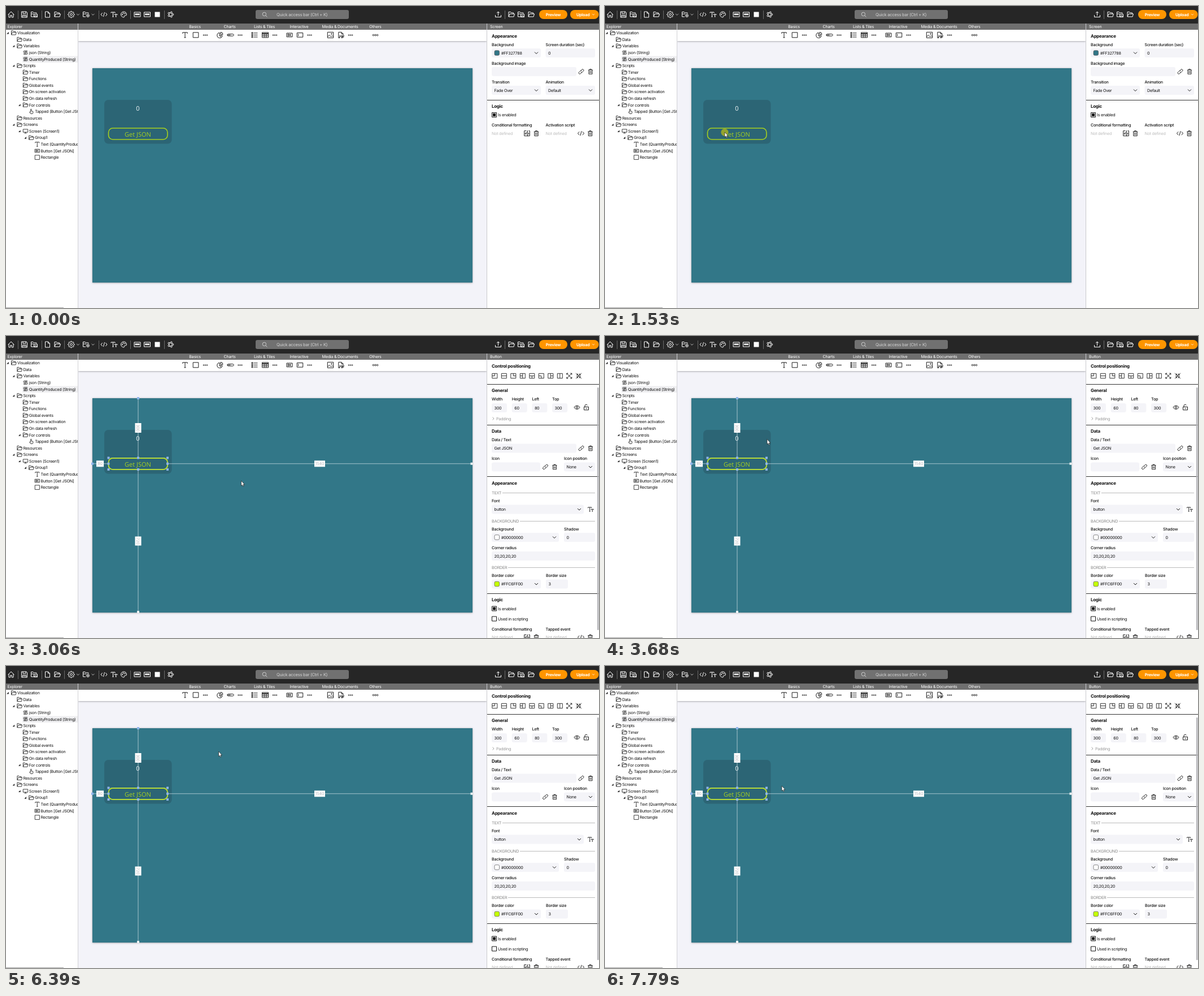
Recreate the animation shown at these times as an HTML page. Size 1050 px wide and 534 px high, loop 8000 ms.

```html
<!DOCTYPE html>
<html lang="en">
<head>
<meta charset="utf-8">
<title>Screen editor</title>
<style>
html, body { margin: 0; width: 100%; height: 100%; overflow: hidden; background: #f3f3f9; }
svg { display: block; width: 1050px; height: 534px; }
text { font-family: Inter, "Liberation Sans", sans-serif; letter-spacing: -.25px; text-rendering: geometricPrecision; white-space: pre; }
.face { font-family: "Open Sans", "Noto Sans", sans-serif; letter-spacing: 0; }
</style>
</head>
<body>
<svg id="stage" viewBox="0 0 1050 534" xmlns="http://www.w3.org/2000/svg"></svg>
<script>
const LOOP = 8000, INK = '#1c1c1c', FIELD = '#f4f4f8', TEAL = '#327788', LIME = '#a6d01f';

// Drawing helpers, each returns markup
const text = (x, y, s, { size = 7.2, fill = '#111', weight = 400, anchor = 'start', more = '' } = {}) =>
  `<text x="${x}" y="${y + size * .36}" font-size="${size}" fill="${fill}" font-weight="${weight}" text-anchor="${anchor}" ${more}>${s}</text>`;
const rect = (x, y, w, h, fill, r = 0, more = '') =>
  `<rect x="${x}" y="${y}" width="${w}" height="${h}" rx="${r}" fill="${fill}" ${more}/>`;
const path = (d, stroke = INK, w = 1, more = '') =>
  `<path d="${d}" fill="none" stroke="${stroke}" stroke-width="${w}" ${more}/>`;
const box = (x, y, w, h) => `M${x} ${y}h${w}v${h}h${-w}z`;
const ring = (x, y, r) => `M${x - r} ${y}a${r} ${r} 0 1 0 ${2 * r} 0a${r} ${r} 0 1 0 ${-2 * r} 0`;
const cog = (n, outer, inner) => 'M' + Array.from({ length: n * 4 }, (_, i) => {
  const a = (i - .5) * Math.PI / (2 * n), r = i % 4 < 2 ? outer : inner;
  return `${(r * Math.cos(a)).toFixed(2)} ${(r * Math.sin(a)).toFixed(2)}`;
}).join('L') + 'z';

const FOLDER = 'M-5 4V-4.5H-1.5L-.3-3H3.5V-1M-5 4-3-1H5.5L4 4z';
const ICONS = {
  home: 'M-5.5 .5 0-5 5.5 .5M-4-1V5H-1.2V1.5H1.2V5H4V-1',
  save: 'M-5-5H3.5L5-3.5V5H-5zM-2.5-5V-1.8H2.5V-5M-3 5V1H3V5M-1.6 2.8H1.6',
  folder: FOLDER,
  folderSave: 'M-5.5 4V-4.5H-2L-.8-3H4V-1.5M-5.5 4V-1H-1M-5.5 4H-1' + box(-.5, -.5, 6, 5) + 'M1 4.5V2.2H4V4.5',
  folderCog: 'M-1 4H-5.5V-4.5H-2L-.8-3H4V-1.5M-5.5-1H0' + ring(3, 2, 2.4) + ring(3, 2, .7),
  file: 'M-4-5H1L4-2V5H-4zM1-5V-2H4',
  gear: cog(8, 5.8, 4.3) + ring(0, 0, 1.9),
  chev: 'M-3-1.5 0 1.5 3-1.5',
  code: 'M-2.8-3-5.5 0-2.8 3M2.8-3 5.5 0 2.8 3M1-4-1 4',
  type: 'M-5-2.5V-4H2V-2.5M-1.5-4V4M-2.7 4H-.3M1.2 1V-.2H6V1M3.6-.2V4M2.8 4H4.5',
  palette: 'M0-5a5 5 0 1 0 0 10c1.5 0 .4-1.8 1-2.6S5 2.8 5 0A5 5 0 0 0 0-5' + ring(-2.4, 0, .7) + ring(-.8, -2.5, .7) + ring(2, -1.8, .7),
  card: box(-5.5, -4, 11, 8) + 'M-4-1.2H4M-4 .6H4M-4-.3H4',
  puzzle: cog(5, 5.2, 3.5) + ring(0, 0, 2.7),
  upload: 'M0 2V-5M-2.5-2.5 0-5 2.5-2.5M-5 1V4.5H5V1',
  search: ring(-.6, -.6, 3.2) + 'M1.8 1.8 4.4 4.4',
  T: 'M-4.2-2.5V-4.5H4.2V-2.5M0-4.5V4.5M-1.6 4.5H1.6',
  square: box(-4.8, -4.5, 9.6, 9),
  pie: 'M-1-4a4.6 4.6 0 1 0 5 5H-1zM1-5V-1H5A4 4 0 0 0 1-5M-1 1 2.5 4.3',
  slider: 'M-4-1.7H4a1.7 1.7 0 0 1 0 3.4H-4a1.7 1.7 0 0 1 0-3.4M-5.5 0H0',
  list: box(-5, -4.5, 2, 2) + box(-5, -1, 2, 2) + box(-5, 2.5, 2, 2) + 'M-1.5-3.5H5.5M-1.5 0H5.5M-1.5 3.5H5.5',
  table: box(-5.5, -4.5, 11, 9) + 'M-5.5-2.8H5.5M-5.5-1.5H5.5M-5.5 1.5H5.5M-1.8-2V4.5M1.8-2V4.5',
  button: box(-5, -3.3, 10, 6.6) + 'M-2.8-1.5V1.5H-1V-1.5zM.8-1.8V1.8M2.9-1.7 1 0 2.9 1.7',
  input: box(-5.2, -3.8, 10.4, 7.6) + 'M-2.8-2V2',
  image: box(-5.2, -5, 10.4, 10) + 'M-5 3-1.8 0 1 3 3 1.2 5 3' + ring(2, -2, .9),
  pdf: 'M-2 5H-4.2V-5H1L4-2V0M1-5V-2H4M-2.5 1H-1V3H-2.5V5M1 1V5H2.5V1zM4 5V1H6M4 3H5.5',
  string: 'M4-3.6H-2.5a1.7 1.7 0 0 0 0 3.4H2.5a1.9 1.9 0 0 1 0 3.8H-4M4-1.8H-2M-4 1.8H2',
  hand: 'M-1.5 1V-4.2a.9.9 0 0 1 1.8 0V-1L3.5 0V3L2.5 4.6H-1.5L-4 1.2-2.8 .6-1.5 1.8',
  screen: box(-5, -4, 10, 6.2) + 'M0 2.2V4.2M-2.5 4.2H2.5',
  link: 'M-.5-2 1.5-4a2 2 0 0 1 2.8 2.8L2 1a2 2 0 0 1-2.8 0M.5 2-1.5 4a2 2 0 0 1-2.8-2.8L-2-1A2 2 0 0 1 .8-1',
  trash: 'M-4.2-3H4.2M-1.5-3V-4.5H1.5V-3M-3.2-3V4.5H3.2V-3M-1.1-1V2.8M1.1-1V2.8',
  rule: 'M-1-4.5H-4.8V4.5H4.8V-4.5H3M1-5V5M-3 2V-1M-1.2 2V-2.5M3 2V-1',
  eye: 'M-5.2 0Q0-6.5 5.2 0Q0 6.5-5.2 0' + ring(0, 0, 1.6),
  lock: box(-4, -1, 8, 5.5) + 'M-2.5-1V-3a2.3 2.3 0 0 1 4.4-.8M0 1V2.8'
};
const icon = (name, x, y, stroke = INK, scale = 1, w = 1) =>
  `<g transform="translate(${x} ${y}) scale(${scale})">${path(ICONS[name], stroke, w, 'stroke-linejoin="round"')}</g>`;
const dots = (x, y) => [-3, 0, 3].map(d => path(ring(x + d, y, .8), INK, .9)).join('');
const divider = x => rect(x, 8, 1, 15, '#6a6a6a');

// Side panel helpers
const PX = 860;
const head = (y, s) => text(PX, y, s, { size: 7.9, weight: 700 });
const label = (x, y, s) => text(x, y, s, { weight: 500 });
const field = (x, y, w, s = '', h = 16) => rect(x, y - h / 2, w, h, FIELD, 3) + text(x + 4.5, y, s);
const select = (x, y, w, s, swatch) => field(x, y, w, swatch ? '' : s) + icon('chev', x + w - 8, y) +
  (swatch ? rect(x + 5, y - 4.3, 8.5, 8.5, swatch, 2, 'stroke="#555" stroke-width=".7"') + text(x + 17, y, s) : '');
const rule = y => rect(852, y, 198, 1, '#333');
const group = (y, s, x) => text(PX, y, s, { fill: '#8a8a8a' }) + rect(x, y, 1043 - x, 1, '#bbb');
const check = (y, s, on) => path(box(860.5, y - 4, 8, 8), '#111', 1, 'stroke-linejoin="round"') +
  (on ? rect(862, y - 2.5, 5, 5, '#111') : '') + text(871, y, s);
const linkTrash = (x, y) => icon('link', x, y, INK, .95) + icon('trash', x + 16.5, y, INK, .95);
const scripts = (y, s) => {
  const none = { fill: '#bdbdbd' };
  return label(PX, y, 'Conditional formatting') + label(955.5, y, s) +
    text(PX, y + 14.7, 'Not defined', none) + text(955.5, y + 14.7, 'Not defined', none) +
    icon('rule', 922.5, y + 14.7) + icon('trash', 939, y + 14.7) +
    icon('code', 1018, y + 14.7) + icon('trash', 1034.5, y + 14.7);
};

function topBar() {
  const row = [['home', 9], ['save', 32.5], ['folderSave', 50], ['file', 73.5], ['folder', 91], ['gear', 115.5],
    ['folderCog', 142], ['code', 173.5], ['type', 191], ['palette', 208.5], ['card', 232.5], ['card', 250],
    ['puzzle', 291.5], ['upload', 871.5], ['folder', 895], ['folderSave', 912], ['folder', 930]];
  const pill = (x, w) => rect(x, 7, w, 16, '#ff9500', 8);
  const bold = { fill: '#fff', weight: 700 };
  return rect(0, 0, 1050, 31, '#262626') + row.map(([n, x]) => icon(n, x, 15, '#fff')).join('') +
    [21, 63, 103, 164, 220, 280, 883].map(divider).join('') +
    icon('chev', 127.5, 15, '#ddd', .8) + icon('chev', 154, 15, '#ddd', .8) +
    rect(263.5, 10.5, 9, 9, '#fff') +
    rect(442, 7, 165, 16, '#717171', 3) + icon('search', 458, 15, '#ccc') +
    text(479, 15, 'Quick access bar (Ctrl + K)', { size: 7.6, fill: '#d4d4d4' }) +
    pill(944, 50) + text(969, 15, 'Preview', { ...bold, anchor: 'middle' }) +
    pill(999, 50.5) + text(1010, 15, 'Upload', bold) + icon('chev', 1040, 15, '#fff', .7);
}

function toolStrip() {
  const groups = [['Basics', 334.5], ['Charts', 396], ['Lists &amp; Tiles', 457.5], ['Interactive', 519],
    ['Media &amp; Documents', 591.5], ['Others', 654]];
  const tools = [['T', 317], ['square', 336], ['pie', 379], ['slider', 397.5], ['list', 440], ['table', 459],
    ['button', 502], ['input', 520.5], ['image', 574.5], ['pdf', 593]];
  return rect(128, 42, 723, 20, '#fff', 0, 'filter="url(#soft)"') +
    rect(0, 31, 1050, 11, '#6f6f6f') +
    groups.map(([s, x]) => text(x, 36.7, s, { fill: '#fff', anchor: 'middle' })).join('') +
    tools.map(([n, x]) => icon(n, x, 51.3)).join('') +
    [353, 414.5, 476, 537.5, 610].map(x => dots(x, 51.5)).join('') +
    [-3.6, 0, 3.6].map(d => path(ring(654 + d, 51.5, 1.3), INK, .9)).join('');
}

function explorer() {
  // depth, icon, label, expanded
  const rows = [[0, 'folder', 'Visualization', 1], [1, 'folder', 'Data'], [1, 'folder', 'Variables', 1],
    [2, 'string', 'json (String)'], [2, 'string', 'QuantityProduced (String)'], [1, 'folder', 'Scripts', 1],
    [2, 'folder', 'Timer'], [2, 'folder', 'Functions'], [2, 'folder', 'Global events'],
    [2, 'folder', 'On screen activation'], [2, 'folder', 'On data refresh'], [2, 'folder', 'For controls', 1],
    [3, 'hand', 'Tapped (Button [Get JSON])'], [1, 'folder', 'Resources'], [1, 'folder', 'Screens', 1],
    [2, 'screen', 'Screen (Screen1)', 1], [3, 'folder', 'Group1', 1], [4, 'T', 'Text (QuantityProduced)'],
    [4, 'button', 'Button [Get JSON]'], [4, 'square', 'Rectangle']];
  return rect(0, 42, 127, 492, '#fff') + rect(29, 88.5, 98, 11.5, '#efeff1') +
    '<g clip-path="url(#tree)">' + rows.map(([depth, name, s, open], i) => {
      const x = 20 + 10.4 * depth, y = 47.6 + 11.58 * i;
      return text(x, y, s) + icon(name, x - 6.3, y, INK, .84) +
        (open ? `<path d="M${x - 15.2} ${y - 1.8}v3.6h-3.6z" fill="#222"/>` : '');
    }).join('') + '</g>' + rect(0, 532.7, 102, 1.3, '#b5b5b5') +
    rect(127, 31, 1, 503, '#d0d0d4') + text(2.5, 36.7, 'Explorer', { fill: '#fff' });
}

function canvas() {
  return rect(153, 110, 673, 379, TEAL, 0, 'filter="url(#soft)"') +
    rect(174, 166, 119.5, 77.5, '#2c6575', 7) +
    text(233.5, 181.5, '0', { size: 11, fill: '#f4f8f9', anchor: 'middle', more: 'class="face"' }) +
    rect(181.5, 216, 104.5, 20, 'none', 7.5, `stroke="${LIME}" stroke-width="1.6"`) +
    text(233.5, 226.9, 'Get JSON', { size: 11, fill: LIME, weight: 500, anchor: 'middle', more: 'class="face"' });
}

function selection() {
  const grip = (x, y, fill = '#8db4ea') => rect(x - 2, y - 2, 4, 4, fill);
  const tag = (x, y, w, s, turn = 0) => `<g transform="translate(${x} ${y}) rotate(${turn})">` +
    rect(-w / 2, -5.5, w, 11, '#fff') + text(0, 0, s, { fill: '#b9bcc0', anchor: 'middle' }) + '</g>';
  const grips = [181.5, 234, 286].flatMap(x => [215.5, 225.8, 236].map(y => x === 234 && y === 225.8 ? '' : grip(x, y)));
  return path('M234 110V215M234 236V488M153 225.8H181M286 225.8H825', '#c4d9df', .8) +
    rect(181.5, 216, 104.5, 20, 'none', 7.5, 'stroke="#c0e220" stroke-width="1.6"') +
    path(box(181.5, 215.5, 104.5, 20.5), '#cfe3ef', .5, 'opacity=".4"') + grips.join('') +
    grip(234, 110) + grip(153, 225.8) + grip(234, 488, '#eef3f5') + grip(824.5, 225.8, '#eef3f5') +
    tag(234, 162.5, 17, '300', 90) + tag(234, 362.5, 16, '720', 90) + tag(166.5, 225.8, 13, '80') + tag(555.5, 225.8, 19, '1540');
}

function screenPanel() {
  return head(53, 'Appearance') + label(PX, 68, 'Background') + label(955.5, 68, 'Screen duration (sec)') +
    select(PX, 83, 87, '#FF327788', TEAL) + field(955.5, 83, 87.5, '0') +
    label(PX, 101, 'Background image') + field(PX, 116, 150) + linkTrash(1018.5, 116) +
    label(PX, 134, 'Transition') + label(955.5, 134, 'Animation') +
    select(PX, 149, 87, 'Fade Over') + select(955.5, 149, 87.5, 'Default') + rule(166) +
    head(177, 'Logic') + check(192.5, 'Is enabled', true) + scripts(210.5, 'Activation script');
}

function buttonPanel() {
  const marks = ['M-4.5 0H0V-4.2', 'M-4.5 0H4.5M0 0V0', 'M0-4.2V0H4.5', 'M0-4.2V4.2M-4.5 0H0', 'M-4.5 0H4.5M0 0V4.2',
    'M-4.5 0H0V4.2', 'M0-4.2V4.2M0 0H4.5', 'M0-4.2V4.2M-2 0H-2'];
  const align = marks.map((d, i) => `<g transform="translate(${865.3 + 16.5 * i} 70.5)">` +
    path(box(-4.5, -4.2, 9, 8.4) + d, INK, .9) + '</g>').join('');
  const spread = (x, out) => `<g transform="translate(${x} 70.5)">` + [0, 90, 180, 270].map(a =>
    path(out ? 'M2-4.5H4.5V-2M4.5-4.5 1.5-1.5' : 'M1.5-4V-1.5H4M1.5-1.5 4.8-4.8', INK, 1, `transform="rotate(${a})"`)).join('') +
    path(box(-1, -1, 2, 2), INK, .8) + '</g>';
  const sizes = [['Width', '300'], ['Height', '60'], ['Left', '80'], ['Top', '300']];
  return head(53, 'Control positioning') + align + spread(997.3, true) + spread(1014, false) + rule(85) +
    head(96.5, 'General') + sizes.map(([s, v], i) => label(PX + 35.7 * i, 111.5, s) + field(PX + 35.7 * i, 127, 27, v)).join('') +
    icon('eye', 1011, 126.3) + icon('lock', 1027.5, 126.3) +
    path('M861.5 143.5 864 146 861.5 148.5', '#999', .9) + text(868, 146, 'Padding', { fill: '#999' }) + rule(157) +
    head(168.5, 'Data') + label(PX, 183.5, 'Data / Text') + field(PX, 198.5, 150, 'Get JSON') + linkTrash(1018.5, 198.5) +
    label(PX, 216.5, 'Icon') + field(PX, 231.5, 86) + linkTrash(955, 231.5) +
    label(988, 216.5, 'Icon position') + select(988, 231.5, 55, 'None') + rule(248) +
    head(260, 'Appearance') + group(277, 'TEXT', 879) + label(PX, 291.5, 'Font') +
    select(PX, 306.5, 163, 'button') + icon('type', 1035, 306.5, INK, .9) +
    group(327, 'BACKGROUND', 910) + label(PX, 341, 'Background') + label(988, 341, 'Shadow') +
    select(PX, 356, 119, '#00000000', '#fff') + field(988, 356, 55, '0') +
    label(PX, 374, 'Corner radius') + field(PX, 389, 183, '20,20,20,20') +
    group(409, 'BORDER', 889) + label(PX, 423.5, 'Border color') + label(956, 423.5, 'Border size') +
    select(PX, 438.5, 87, '#FFC6FF00', '#c6ff00') + field(956, 438.5, 39, '3') + rule(455) +
    head(466.5, 'Logic') + check(482, 'Is enabled', true) + check(500, 'Used in scripting', false) +
    scripts(518, 'Tapped event') + rect(1047, 91, 2.5, 429, '#b4b4b8', 1);
}

const part = (id, body) => `<g id="${id}">${body}</g>`;
const title = s => text(857, 36.7, s, { fill: '#fff' });
const stage = document.getElementById('stage');
stage.innerHTML = `<defs>
  <filter id="soft" x="-5%" y="-20%" width="110%" height="150%"><feDropShadow dx="0" dy=".5" stdDeviation="1.5" flood-opacity=".4"/></filter>
  <clipPath id="tree"><rect y="42" width="127" height="490"/></clipPath></defs>` +
  rect(0, 0, 1050, 534, '#f3f3f9') + canvas() + part('selection', selection()) +
  toolStrip() + explorer() + topBar() +
  rect(852, 42, 198, 492, '#fff') + rect(851, 31, 1, 503, '#c8c8cc') +
  part('screenTitle', title('Screen')) + part('buttonTitle', title('Button')) +
  part('screenPanel', screenPanel()) + part('buttonPanel', buttonPanel()) +
  '<circle id="press" cx="212" cy="223.3" r="6.6" fill="#9aa82a" opacity=".94"/>' +
  '<path id="cursor" d="M0 0V8.8L1.9 7.2 3.2 10 4.6 9.4 3.4 6.6H6z" fill="#fff" stroke="#222" stroke-width=".7"/>';

const part$ = Object.fromEntries([...stage.querySelectorAll('g[id], #press, #cursor')].map(e => [e.id, e]));
const show = (id, on) => part$[id].setAttribute('visibility', on ? 'visible' : 'hidden');

// Pointer runs: start, end, step count, waypoints [step, x, y]
const RUNS = [
  [210, 980, 11, [[1, 940, 517], [5, 560, 345], [8, 340, 262], [11, 235, 234]]],
  [1060, 1280, 4, [[0, 235, 234], [3, 216, 214], [4, 212, 223]]],
  [2520, 3290, 11, [[0, 212, 223], [3, 270, 250], [6, 370, 274], [8, 416.5, 256], [11, 377, 210]]],
  [3370, 3760, 6, [[0, 377, 210], [6, 269, 177]]],
  [4920, 5000, 2, [[0, 269, 177], [1, 267, 172.5], [2, 265, 169]]],
  [5930, 6690, 11, [[0, 265, 169], [4, 330, 145], [7, 376.5, 151], [11, 406, 174]]],
  [6770, 7560, 11, [[0, 406, 174], [4, 385, 163], [7, 370, 172], [11, 358, 190]]],
  [7640, 7790, 3, [[0, 358, 190], [3, 313, 212]]]
];

// Smooth curve through the waypoints at step k
function along(pts, k) {
  const last = pts.length - 1;
  const i = Math.max(0, Math.min(last - 1, pts.findIndex(p => p[0] >= k) - 1));
  const a = pts[i], b = pts[i + 1], span = b[0] - a[0], u = (k - a[0]) / span;
  const slope = (j, c) => {
    const p = pts[Math.max(0, j - 1)], q = pts[Math.min(last, j + 1)];
    return (q[c] - p[c]) / (q[0] - p[0]) * span;
  };
  return [1, 2].map(c => (1 + 2 * u) * (1 - u) ** 2 * a[c] + u * (1 - u) ** 2 * slope(i, c) +
    u * u * (3 - 2 * u) * b[c] + u * u * (u - 1) * slope(i + 1, c));
}

function pointer(t) {
  const run = RUNS.filter(r => t >= r[0]).pop();
  if (!run) return null;
  const [from, to, n, pts] = run;
  return along(pts, Math.min(n, Math.floor((t - from) * (n - 1) / (to - from) + .1) + 1));
}

function draw(t) {
  const tip = pointer(t), selected = t >= 1680, loaded = t >= 2050;
  show('cursor', tip);
  if (tip) part$.cursor.setAttribute('transform', `translate(${tip})`);
  show('press', t >= 1530 && t < 2370);
  show('selection', selected);
  show('screenTitle', !selected);
  show('buttonTitle', selected);
  show('screenPanel', !loaded);
  show('buttonPanel', loaded);
}

function tick() {
  draw(performance.now() % LOOP);
  requestAnimationFrame(tick);
}
tick();
</script>
</body>
</html>
```
